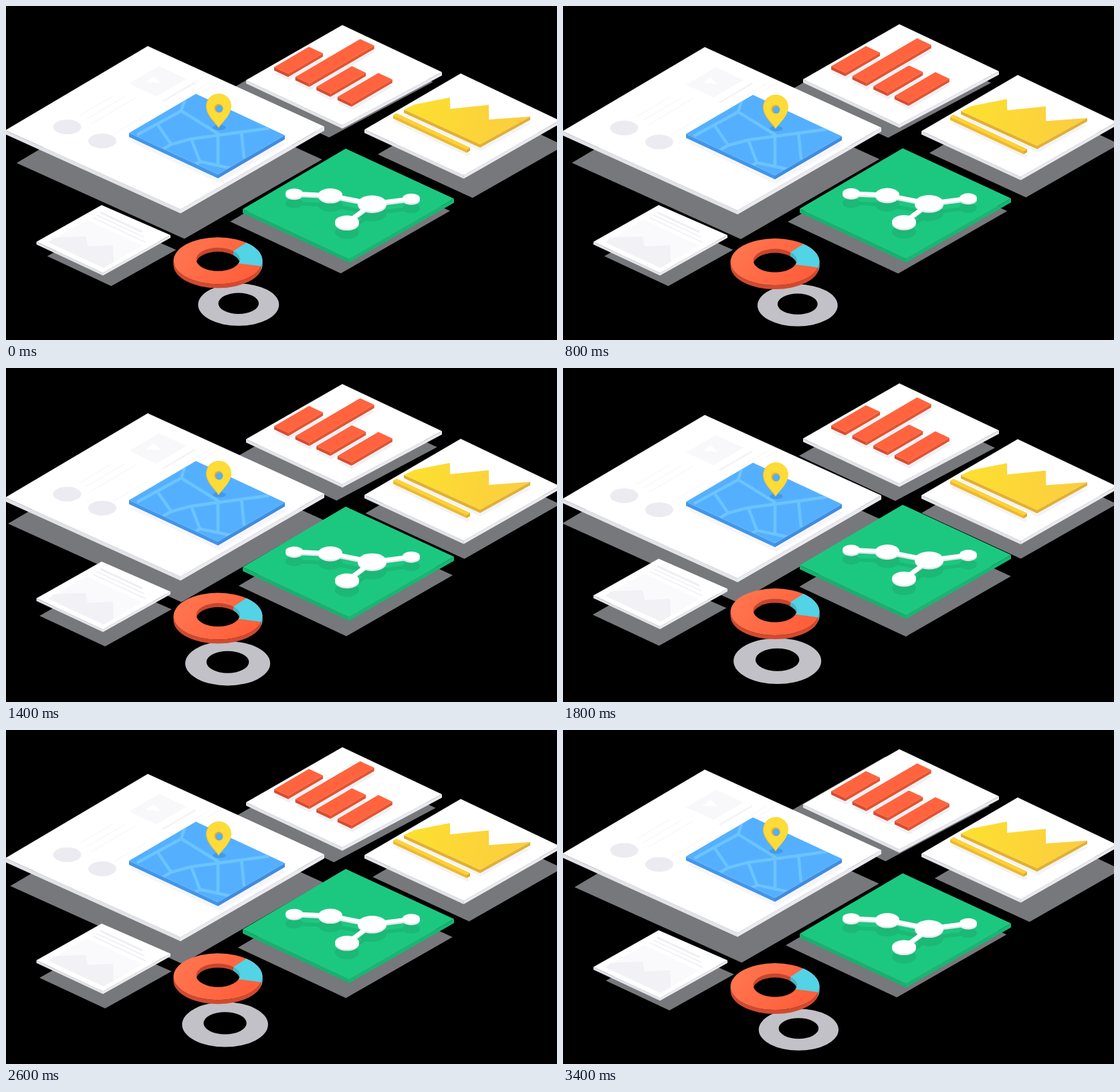
Write an HTML page with a canvas that moves like this. It is 824 px wide and 500 px high and loops after 3600 ms.

```html
<!DOCTYPE html>
<html lang="en">
<head>
<meta charset="utf-8">
<title>Floating dashboard</title>
<style>
html, body { margin: 0; height: 100%; overflow: hidden; background: #000; }
canvas { display: block; }
</style>
</head>
<body>
<canvas id="stage" width="824" height="500"></canvas>
<script>
const ctx = document.getElementById('stage').getContext('2d');
const LOOP = 3600, STEP = 200, PERIOD = 3200;
const DOWN = 0.466, UP = 0.585; // slopes of the two isometric axes

const pts = (...v) => v.flatMap((x, i) => i % 2 ? [] : [[x, v[i + 1]]]);
const shift = (p, dx, dy) => p.map(([x, y]) => [x + dx, y + dy]);

// Isometric rectangle from its top corner: width to the right, length to the left
const tile = (x, y, w, l) =>
  pts(x, y, x + w, y + w * DOWN, x + w - l, y + w * DOWN + l * UP, x - l, y + l * UP);

function trace(p) {
  ctx.beginPath();
  p.forEach(([x, y]) => ctx.lineTo(x, y));
}

function poly(p, fill) {
  trace(p);
  ctx.fillStyle = fill;
  ctx.fill();
}

function line(p, color, width) {
  trace(p);
  ctx.strokeStyle = color;
  ctx.lineWidth = width;
  ctx.stroke();
}

const rule = (x, y, length, slope, color, width) =>
  line(pts(x, y, x + length, y + length * slope), color, width);

function oval(x, y, rx, ry, fill) {
  ctx.beginPath();
  ctx.ellipse(x, y, rx, ry, 0, 0, 7);
  ctx.fillStyle = fill;
  ctx.fill();
}

function blend(x0, y0, x1, y1, from, to) {
  const g = ctx.createLinearGradient(x0, y0, x1, y1);
  g.addColorStop(0, from);
  g.addColorStop(1, to);
  return g;
}

// Extruded outline whose last three points are right, bottom and left
function slab(p, depth, top, leftSide, rightSide) {
  const [r, b, l] = p.slice(-3);
  const side = (a, c, fill) => poly([a, c, [c[0], c[1] + depth], [a[0], a[1] + depth]], fill);
  side(l, b, leftSide);
  side(b, r, rightSide);
  poly(p, top);
}

function drawPin(x, tip, r, fill) {
  const y = tip - r * 1.75;
  ctx.beginPath();
  ctx.moveTo(x, tip);
  ctx.bezierCurveTo(x - 4, tip - 8, x - r, y + 14, x - r, y);
  ctx.arc(x, y, r, Math.PI, 0);
  ctx.bezierCurveTo(x + r, y + 14, x + 4, tip - 8, x, tip);
  ctx.fillStyle = fill;
  ctx.fill();
}

function drawReport() {
  poly(tile(229, 90, 41, 45), '#f8f8fa');
  poly(pts(209, 114, 221, 105, 231, 115), '#fff');
  rule(234, 143, 49, -UP, '#f3f3f6', 2.5);
  for (let i = 0; i < 3; i++) rule(110 + 9 * i, 164 + 6 * i, 50 + 8 * i, -UP, '#f5f5f8', 1);
  rule(162, 191, 48, -UP, '#f5f5f8', 1);
  for (let i = 0; i < 2; i++) rule(275 + 17 * i, 132 - 2 * i, 30, -UP, '#f5f5f8', 1);
  oval(91.5, 181, 21, 11, '#ebebf1');
  oval(144, 202, 21, 11, '#ebebf1');

  const map = tile(284, 131.5, 133, 100);
  poly(shift(map, 2, 13), '#f6f6fa');
  slab(map, 6, '#54b0ff', '#4296ea', '#408ce0');
  ctx.save();
  trace(map);
  ctx.clip();
  [pts(268, 138, 262, 157, 196, 193), pts(262, 157, 317, 191, 317, 240), pts(225, 175, 247, 207),
   pts(228, 218, 247, 207, 277, 199, 394, 183), pts(277, 199, 290, 233, 342, 244),
   pts(290, 233, 268, 246), pts(352, 187, 356, 228)].forEach(p => line(p, '#6cc4ff', 4.5));
  ctx.restore();

  oval(319, 182, 10, 4, '#429be8');
  drawPin(317.5, 182.5, 18.5, '#ecc033');
  drawPin(318.5, 182, 18.5, '#fddb38');
  oval(318, 153, 6.5, 6.5, '#e0b02e');
  oval(319, 154, 5.3, 5.5, '#55aef8');
}

function drawBars() {
  const bars = [52, 97, 53, 61].map((length, i) =>
    tile(401 + 31.6 * i + length, 91.5 + 14.8 * i - length * UP, 21, length));
  bars.forEach(b => poly(shift(b, 1, 10), '#f0f0f5'));
  bars.forEach(b => slab(b, 5, '#ff643f', '#d94b2e', '#e4532f'));
}

function drawArea() {
  const area = pts(595, 155, 611, 147.5, 664, 137, 664, 154, 722, 148, 722, 170, 784, 165.5, 709, 207, 595, 155);
  const strip = tile(584, 160.5, 110, 5);
  [area, strip].forEach(p => poly(shift(p, 1, 10), '#f3f3f7'));
  slab(area, 5, blend(600, 145, 770, 190, '#fde02f', '#fbcd40'), '#e3b12c', '#e0b036');
  slab(strip, 5, '#fdd233', '#f0b92c', '#e2ab2b');
}

function drawGraph() {
  const nodes = [[431, 280.5, 13], [485, 283, 18], [547.5, 295.5, 21.5], [606, 288, 13], [510, 323.5, 18]];
  const layer = (dy, fill) => {
    [[0, 1], [1, 2], [2, 3], [2, 4]].forEach(e =>
      line(e.map(i => [nodes[i][0], nodes[i][1] + dy]), fill, 5.5));
    nodes.forEach(([x, y, r]) => oval(x, y + dy, r, r * .56, fill));
  };
  layer(15, '#1bb876');
  layer(2.5, '#e8e8ee');
  layer(0, '#fff');
}

function drawNote() {
  poly(tile(121, 320, 83, 58), '#fafafc');
  poly(pts(64, 354, 71, 347, 119, 345, 122, 360, 160, 358, 161, 383, 146, 392), '#f1f1f6');
  for (let i = 0; i < 3; i++) rule(141 - 5.5 * i, 309 + 4 * i, 63 + 8 * i, DOWN, '#eeeef3', i ? 1.5 : 3);
}

function drawDonut() {
  const x = 317, y = 381.3, depth = 6, teal = '#52d3e6', tealSide = '#41b9cb';
  const arc = (dy, from, to, back) => ctx.ellipse(x, y + dy, 66.5, 35, 0, from, to, back);
  const wall = (from, to, fill) => {
    ctx.beginPath();
    arc(0, from, to);
    arc(depth, to, from, true);
    ctx.fillStyle = fill;
    ctx.fill();
  };
  wall(0, Math.PI, '#d04a30');
  wall(0, .24, tealSide);
  oval(x, y, 66.5, 35, blend(260, 350, 350, 415, '#ff7650', '#ff603b'));
  ctx.beginPath();
  arc(0, -.88, .24);
  ctx.ellipse(x, y - 2, 32.5, 17, 0, .35, -.8, true);
  ctx.fillStyle = teal;
  ctx.fill();
  oval(x, y - 2, 32.5, 17.5, '#c7462d');
  ctx.save();
  ctx.clip();
  poly(pts(340, 364, 352, 364, 352, 386, 340, 373), tealSide);
  oval(x, y + 4, 32.5, 17.5, '#000');
  ctx.restore();
}

// lift: vertical swing; drop: shadow offset at the peak; drift: how far the shadow slides
const cards = [
  { face: pts(212, 60, 476, 180.5, 261, 304.5, -1, 186), depth: 6, draw: drawReport,
    peak: 1900, lift: 5.6, drop: [0, 46.5], drift: 3.7 },
  { face: pts(503, 28.5, 652, 99, 503, 178.5, 359, 111), depth: 5, draw: drawBars,
    peak: 1850, lift: -2.9, drop: [-6, 20.5], drift: -7.3 },
  { face: pts(680, 101, 828, 171.5, 684.5, 253.5, 536, 185), depth: 5, draw: drawArea,
    peak: 1690, lift: 2.8, drop: [0, 32], drift: 6.7 },
  { face: pts(143, 298, 246, 343, 145, 399.5, 45.5, 353), depth: 4, draw: drawNote,
    peak: 2000, lift: -7.6, drop: [-2, 16], drift: 8.4 },
  { face: pts(508, 213.5, 670, 288.5, 513, 378.5, 354, 304), depth: 6, draw: drawGraph,
    colors: ['#1cc880', '#19b06f', '#18b673'],
    peak: 1970, lift: -5.1, drop: [0, 23.5], drift: -7.1 }
];
const donut = { peak: 2060, lift: -10.9, draw: drawDonut };

const swing = (item, t) => Math.cos((t - item.peak) / PERIOD * 2 * Math.PI);

function cardShadow({ face, drop, drift }, c) {
  const [top, right, bottom, left] = face;
  const midX = (left[0] + right[0]) / 2, midY = (top[1] + bottom[1]) / 2;
  const slide = drift * (1 - c), scale = 1 - Math.sign(drift) * .023 * (1 - c);
  poly(face.map(([x, y]) => [
    midX + drop[0] + slide + (x - midX) * scale,
    midY + drop[1] + slide * .4 + (y - midY) * scale
  ]), '#77787b');
}

function donutShadow(c) {
  const x = 336.5 - 18.2 * c, y = 443.7 - 5.7 * c, r = 62.6 + 3.4 * c;
  ctx.beginPath();
  ctx.ellipse(x, y, r, r * .523, 0, 0, 7);
  ctx.closePath();
  ctx.ellipse(x, y - 2, r * .5, r * .26, 0, 0, 7);
  ctx.fillStyle = '#c1c1c7';
  ctx.fill('evenodd');
}

function floating(item, t) {
  ctx.save();
  ctx.translate(0, item.lift * (swing(item, t) - swing(item, 0)));
  if (item.face) slab(item.face, item.depth, ...(item.colors || ['#fff', '#e2e2e9', '#e9e9ef']));
  item.draw();
  ctx.restore();
}

function frame(now) {
  const t = Math.floor(now % LOOP / STEP) * STEP;
  ctx.clearRect(0, 0, 824, 500);
  cards.forEach(card => cardShadow(card, swing(card, t)));
  donutShadow(swing(donut, t));
  [...cards, donut].forEach(item => floating(item, t));
  requestAnimationFrame(frame);
}
frame(0);
</script>
</body>
</html>
```
